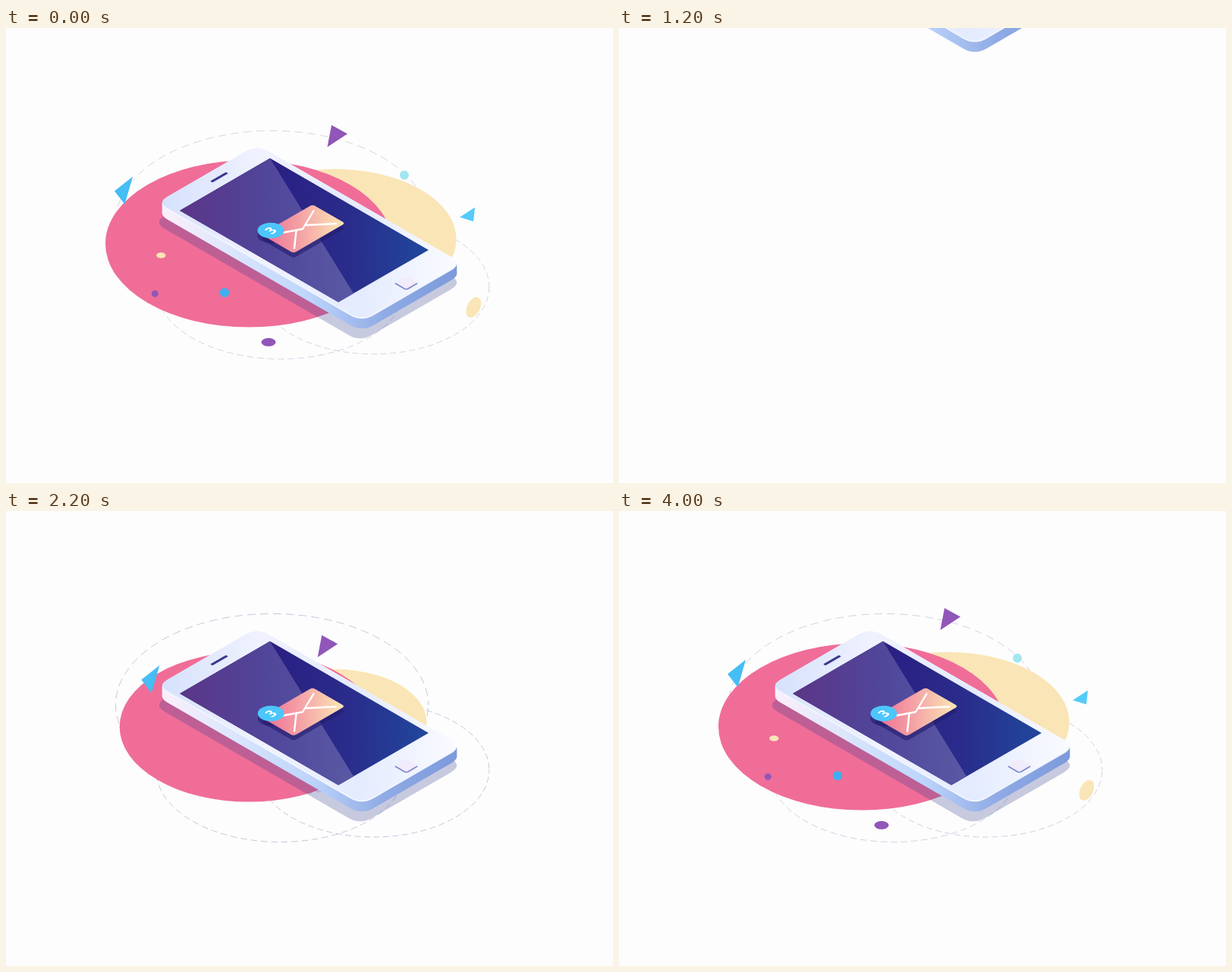
Recreate the animation shown at these times as an HTML page with a canvas. Size 800x600 px, loop 4100 ms.

```html
<!DOCTYPE html>
<html lang="en">
<head>
<meta charset="utf-8">
<title>Phone message</title>
<style>
  html, body { margin: 0; width: 100%; height: 100%; overflow: hidden; background: #fdfdfd; }
  canvas { display: block; width: 800px; height: 600px; }
</style>
</head>
<body>
<canvas id="stage" width="800" height="600"></canvas>
<script>
const LOOP = 4100, STEP = 100, TURN = 1400;   // before TURN things leave, after it they arrive
const PAPER = '#fdfdfd', CREAM = '#fae5b6', VIOLET = '#9056b8';
const ctx = document.getElementById('stage').getContext('2d');

// Timing helpers
const part = (t, from, to) => Math.min(1, Math.max(0, (t - from) / (to - from)));
const easeOut = (p, power = 3) => 1 - (1 - p) ** power;
const backOut = p => 1 + 2.3 * (p - 1) ** 3 + 1.3 * (p - 1) ** 2;

// Isometric plane: u runs down to the right, v up to the right
const iso = (x, y, u, v) => [x + .866 * (u + v), y + .501 * (u - v)];
const corners = (x, y, a, b) =>
  [[-1, -1], [-1, 1], [1, 1], [1, -1]].map(([i, j]) => iso(x, y, i * a / 2, j * b / 2));

function polygon(pts) {
  const path = new Path2D();
  pts.forEach(p => path.lineTo(...p));
  path.closePath();
  return path;
}
function slab(x, y, a, b, r) {
  const path = new Path2D();
  const pts = corners(x, y, a, b);
  const toward = ([px, py], [qx, qy]) => {
    const k = r / Math.hypot(qx - px, qy - py);
    return [px + (qx - px) * k, py + (qy - py) * k];
  };
  pts.forEach((p, i) => {
    path.lineTo(...toward(p, pts[(i + 3) % 4]));
    path.quadraticCurveTo(...p, ...toward(p, pts[(i + 1) % 4]));
  });
  path.closePath();
  return path;
}
function oval(x, y, rx, ry, turn = 0) {
  const path = new Path2D();
  path.ellipse(x, y, rx, ry, turn, 0, Math.PI * 2);
  return path;
}

// Painting helpers
function shade(x0, x1, ...colors) {
  const g = ctx.createLinearGradient(x0, 0, x1, 0);
  colors.forEach((color, i) => g.addColorStop(i / (colors.length - 1), color));
  return g;
}
function fill(path, color) {
  ctx.fillStyle = color;
  ctx.fill(path);
}
function line(d, color, width) {
  ctx.strokeStyle = color;
  ctx.lineWidth = width;
  ctx.stroke(new Path2D(d));
}
function layer(draw, { x = 0, y = 0, cx = 0, cy = 0, scale = 1, alpha = 1 }) {
  if (alpha <= 0 || scale <= 0) return;
  ctx.save();
  ctx.globalAlpha = alpha;
  ctx.translate(cx + x, cy + y);
  ctx.scale(scale, scale);
  ctx.translate(-cx, -cy);
  draw();
  ctx.restore();
}

// Phone parts
const THICK = 13, RADIUS = 18;
const faceBox = [400, 270.9, 313, 153.6], screenBox = [393, 266.7, 241.3, 137.3];
const face = slab(...faceBox, RADIUS);
const shadow = slab(398, 295.8, 315, 156, RADIUS);
const button = slab(527.5, 336, 18.5, 17.5, 5);
const speaker = slab(281, 196.8, 3.5, 24, 1);
const letter = slab(391.5, 264.8, 49.6, 78.5, 4);
const badge = oval(349, 267, 17.5, 10.3);

const [faceLeft, , faceRight] = corners(...faceBox);
const inset = RADIUS * .433;
const flank = polygon([
  [faceLeft[0] + inset, faceLeft[1]], [faceRight[0] - inset, faceRight[1]],
  [faceRight[0] - inset, faceRight[1] + THICK], [faceLeft[0] + inset, faceLeft[1] + THICK]
]);
const [screenLeft, screenTop, , screenBottom] = corners(...screenBox);
const screen = polygon(corners(...screenBox));
const glare = polygon([screenLeft, screenTop, iso(393, 266.7, 120.6, -45.5), screenBottom]);

const bodyTone = shade(205, 594, '#fcf0fb', '#dae5fc', '#bdd5fb', '#90abe5', '#7c9adb');
const faceTone = shade(205, 594, '#d5e1fc', '#f0f2fe', '#e4ebfe', '#fafbff');
const screenTone = shade(348, 557, '#2a1f82', '#2a2c8b', '#20489c');
const glareTone = shade(229, 458, '#5b3587', '#50469a', '#5959a4');
const letterTone = shade(345, 444, '#ef7396', '#f5aaa8', '#fbe6b4');

// Confetti, in order of launch; the ones that stay return later
const HOME = [390, 265];
const tri = (color, pts, extra) => ({
  color, shape: polygon(pts), ...extra,
  x: pts.reduce((sum, p) => sum + p[0] / 3, 0),
  y: pts.reduce((sum, p) => sum + p[1] / 3, 0)
});
const dot = (color, x, y, rx, ry, extra = {}) =>
  ({ color, x, y, shape: oval(x, y, rx, ry, extra.turn), ...extra });
const bits = [
  tri('#45bdf5', [[143, 215], [167, 196], [156.5, 232.5]], { stays: true, sways: true }),
  tri(VIOLET, [[429, 128], [450, 139.5], [423.5, 157]]),
  dot(CREAM, 204.3, 299.8, 6.2, 3.7),
  dot(VIOLET, 196.3, 350.3, 4.5, 4.4),
  dot('#3faeef', 288, 349, 6.3, 6),
  dot(CREAM, 616.3, 368.3, 8.5, 14.3, { stays: true, turn: .45 }),
  dot(VIOLET, 346, 414.3, 9.5, 5.5),
  tri('#55cbfb', [[618, 236.5], [616, 255], [598, 249.5]]),
  dot('#a3e6f0', 525, 194, 6, 6, { stays: true })
];

function drawBit(t, { x, y, color, shape, stays, sways }, i) {
  const launch = 1860 + 100 * i;
  const reach = t < TURN
    ? 1 - (stays ? part(t, 600, 900) : part(t, 0, 440)) ** 3
    : easeOut(part(t, launch, launch + 900), 4);
  if (reach <= 0) return;
  const sway = sways ? 1 - Math.cos(4 * Math.PI * t / LOOP) : 0;
  layer(() => fill(shape, color), {
    x: (HOME[0] - x) * (1 - reach) + 2.2 * sway,
    y: (HOME[1] - y) * (1 - reach) - 1.5 * sway
  });
}

const rings = [
  [350.5, 255.5, 206, 120],
  [361.5, 342.5, 163.5, 94],
  [484.3, 341.5, 152.5, 88.5]
];
function drawRings(t) {
  ctx.save();
  ctx.strokeStyle = '#c6c7dd';
  ctx.globalAlpha = t < TURN
    ? .75 * (1 - part(t, 0, 600) ** 4)
    : part(t, 1500, 1900) - .2 * part(t, 2700, LOOP);
  for (const ring of rings) {
    ctx.setLineDash([ring[2] / 21, ring[2] / 29]);
    ctx.lineDashOffset = -t / 100;
    ctx.stroke(oval(...ring));
  }
  ctx.restore();
}

function drawBlob(t, [cx, cy, rx, ry], color, leave, arrive) {
  const out = 1 - part(t, leave, leave + 600) ** 2;
  const look = t < TURN
    ? { scale: out, alpha: out }
    : { scale: easeOut(part(t, arrive, arrive + 800)) };
  layer(() => fill(oval(cx, cy, rx, ry), color), { cx, cy, ...look });
}

function drawLetter() {
  const dark = 'rgba(36, 28, 110, .62)';
  layer(() => {
    fill(letter, dark);
    fill(badge, dark);
  }, { y: 6.5 });
  fill(letter, letterTone);
  line('M405.5 241L391 265L364 270M380 290.5L382.5 267.5M396 260L435 258', '#fff', 2.4);
  fill(badge, '#4cc6fb');
  ctx.save();
  ctx.transform(.866, -.5, .866, .5, 349, 267);
  ctx.font = 'bold 17px "Open Sans", Arial, sans-serif';
  ctx.textAlign = 'center';
  ctx.fillStyle = '#fff';
  ctx.fillText('3', 0, 6);
  ctx.restore();
}

function drawPhone(t) {
  layer(() => fill(face, bodyTone), { y: THICK });
  fill(flank, bodyTone);
  fill(face, '#f2f5ff');
  ctx.save();
  ctx.clip(face);
  ctx.translate(0, -2);
  fill(face, faceTone);
  ctx.restore();

  fill(screen, screenTone);
  fill(glare, glareTone);
  fill(speaker, '#3a3790');
  fill(button, '#f1ebfb');
  line('M513.5 337L525 343.8Q527.5 345.2 530 343.8L541.5 337', '#7f88cd', 1.7);

  const scale = t < TURN ? 1 - part(t, 580, 800) ** 2 : backOut(part(t, 2050, 2400));
  layer(drawLetter, { cx: 391, cy: 265, scale });
}

const phoneLift = t => t < TURN
  ? 58 * (Math.max(0, t - 700) / 300) ** 3.6
  : 614 * (1 - part(t, 1550, 1900)) ** 3;

function draw(t) {
  ctx.fillStyle = PAPER;
  ctx.fillRect(0, 0, 800, 600);
  drawRings(t);
  drawBlob(t, [433, 278.5, 160.5, 92.5], CREAM, 450, 1900);
  drawBlob(t, [320, 284.5, 189, 110], '#f06d98', 100, 1770);
  bits.forEach((bit, i) => drawBit(t, bit, i));
  const shadowAlpha = t < TURN ? 1 - part(t, 1000, 1200) : part(t, 1600, 1900);
  layer(() => fill(shadow, 'rgba(50, 56, 138, .265)'), { alpha: shadowAlpha });
  layer(() => drawPhone(t), { y: -phoneLift(t) });
}

ctx.lineCap = ctx.lineJoin = 'round';
const start = performance.now();
function tick() {
  // The motion advances in held steps of a tenth of a second
  const t = (performance.now() - start + 5) % LOOP;
  draw(Math.floor(t / STEP) * STEP);
  requestAnimationFrame(tick);
}
tick();
</script>
</body>
</html>
```
